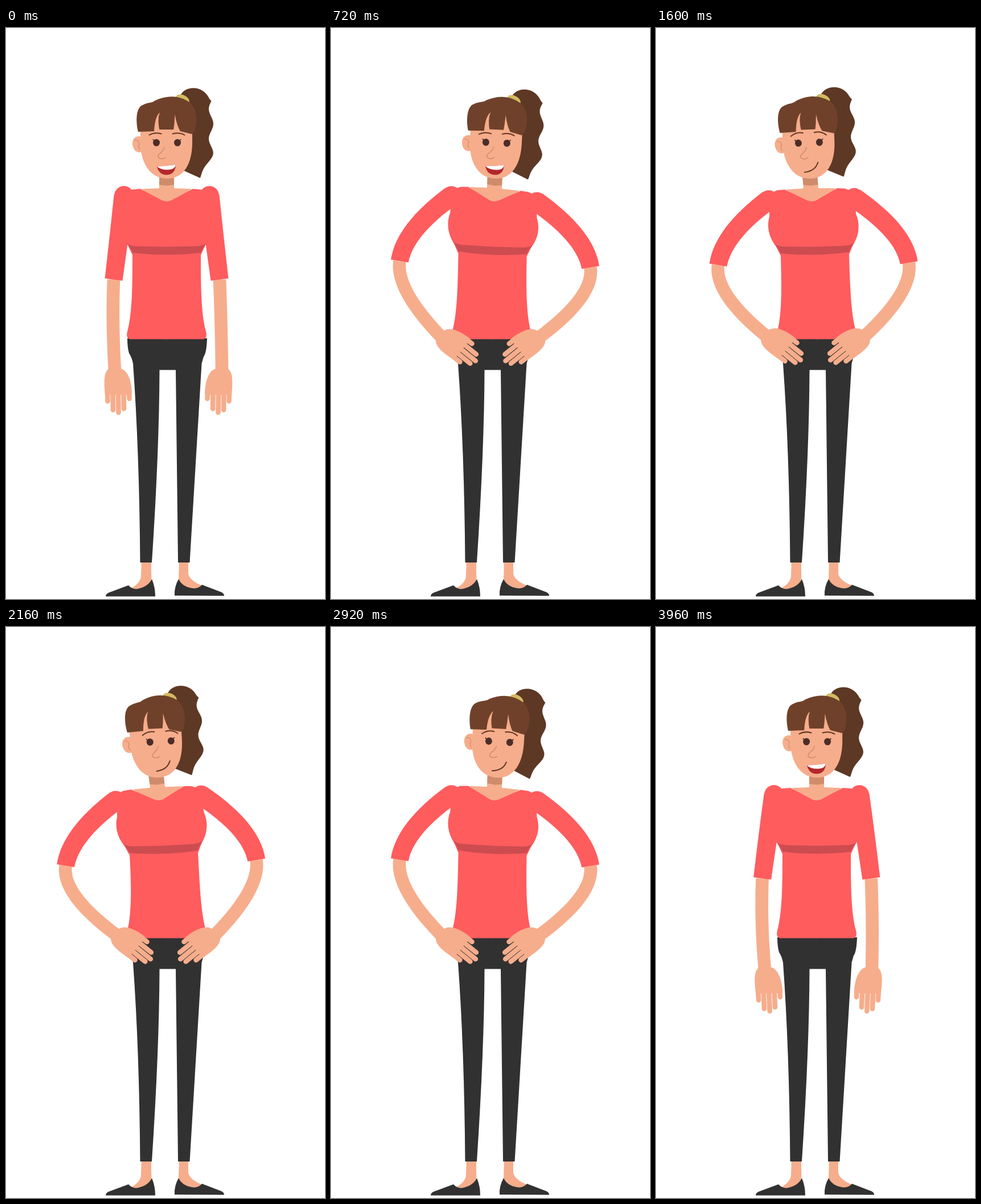
Write an HTML page with a canvas that moves like this. It is 560x1001 px and loops after 4 s.

```html
<!DOCTYPE html>
<html lang="en">
<head>
<meta charset="utf-8">
<title>Hands on hips</title>
<style>
html, body { margin: 0; width: 100%; height: 100%; overflow: hidden; background: #fff; }
canvas { display: block; width: 560px; height: 1001px; }
</style>
</head>
<body>
<canvas id="stage" width="560" height="1001"></canvas>
<script>
const g = document.getElementById('stage').getContext('2d');
const LOOP = 4000, STEP = 40, RAD = Math.PI / 180, MID = 282;
const C = {
  shirt: '#ff5c5e', fold: '#cd4c50', pants: '#313131', skin: '#f6ad8c', shade: '#cf8c6b',
  fringe: '#70412a', tail: '#5d3825', tie: '#d3bb62', eye: '#4c2d27', brow: '#603620', lip: '#b3272b'
};

const mix = (a, b, k) => a + (b - a) * k;
const ease = u => (1 - Math.cos(Math.PI * Math.min(1, Math.max(0, u)))) / 2;
// Rises from 0 to 1 and back between two times
const bump = (t, from, to) => ease(1 - Math.abs(2 * (t - from) / (to - from) - 1));

function fill(d, color) {
  g.fillStyle = color;
  g.fill(new Path2D(d));
}

function line(d, color, width) {
  g.strokeStyle = color;
  g.lineWidth = width;
  g.lineCap = g.lineJoin = 'round';
  g.stroke(new Path2D(d));
}

function dot(x, y, rx, ry, color, turn = 0) {
  g.fillStyle = color;
  g.beginPath();
  g.ellipse(x, y, rx, ry, turn, 0, 7);
  g.fill();
}

// Bends the torso: the higher the point, the more it shifts and tilts
function bender(dx, tilt) {
  return (x, y) => {
    const w = Math.max(0, (545 - y) / 250);
    return [x + dx * w * w, y + (x - MID) * Math.tan(tilt * RAD) * w];
  };
}

// Fills a half shape and its mirror image, both bent
function both(d, color, bend) {
  for (const side of [1, -1]) {
    fill(d.replace(/([\d.]+),([\d.]+)/g, (_, x, y) => bend(MID + side * (x - MID), +y).join()), color);
  }
}

function torso(bend) {
  both('M269,250 L283,250 L283,306 L268,304 L238,282 L269,281 Z', C.skin, bend);
  both('M269,250 L283,250 L283,276.5 L269,275 Z', C.shade, bend);
  both('M236,282 L222,283 L207,290 L206,328 C200,345 202,364 214,381 L222,398 ' +
    'C222,445 222,500 213,532 Q210,543 217,545.5 L283,545.5 L283,304 Q276,304 270,300 Z', C.shirt, bend);
}

function fold(bend) {
  both('M211,376.5 Q217,382 230,382.5 L283,383.5 L283,397.5 Q250,397.5 222,394 Q219,385 211,376.5 Z', C.fold, bend);
}

// Tapered strip along a quadratic curve
function strip(a, c, b, w0, w1, color) {
  const left = [], right = [], n = 16;
  for (let i = 0; i <= n; i++) {
    const u = i / n, v = 1 - u, w = mix(w0, w1, u);
    const [x, y] = a.map((p, k) => v * v * p + 2 * u * v * c[k] + u * u * b[k]);
    const [dx, dy] = a.map((p, k) => v * (c[k] - p) + u * (b[k] - c[k]));
    const nx = -dy / Math.hypot(dx, dy) * w, ny = dx / Math.hypot(dx, dy) * w;
    left.push([x + nx, y + ny]);
    right.unshift([x - nx, y - ny]);
  }
  fill('M' + left.concat(right).join('L') + 'Z', color);
}

function hand([x, y], side, turn) {
  g.save();
  g.translate(x, y);
  g.scale(-side, 1);
  g.rotate(turn * RAD);
  fill('M-10 -3 C-18 2 -20 14 -17 43 L22 43 L30 42 C30 22 24 0 10 -3 Z', C.skin);
  for (let i = 0; i < 5; i++) {
    const fx = -13 + 9.5 * i, tip = 74 - 5.5 * (i - 1.9) ** 2;
    line(`M${fx} 38 L${fx + 0.5} ${tip}`, C.skin, 8.6);
  }
  g.restore();
}

// side is -1 for the arm at the left, 1 for the one at the right
function arm(side, m, lean, tilt, bend) {
  const lift = ease(m / 700) ** 0.7, reach = ease(m / 800);
  const axis = MID + 6 * lift - 16 * lean;
  const out = mix(93, 167.5, lift);
  const cuffY = 441 - 27.5 * reach + side * 1.4 * tilt * lift;
  const cuff = [axis + side * out, cuffY];
  const upper = [axis + side * (out - 9), cuffY - 70 + 15 * lift];
  const lower = [axis + side * (out + 3 + 4 * lift), cuffY + 78 - 28 * lift];
  const wrist = [285 - 5 * reach + side * (94 - 7 * reach), 600 - 60.5 * reach];
  const top = bend(MID + side * 75, 294);
  top[1] += 5.5 * lift;

  strip(cuff, lower, wrist, 11.3, 11.3, C.skin);
  hand(wrist, side, -50 * lift);
  dot(...top, 17, 17, C.shirt);
  strip(top, upper, cuff, 17.5, 15.6, C.shirt);
}

function legs() {
  fill('M238 930 L255 930 L255 955 Q257 970 250 980 L212 986 Q237 975 237 960 Z', C.skin);
  fill('M304 930 L320 930 L320 957 Q323 970 348 979 L345 986 L310 984 L303 968 Z', C.skin);
  fill('M175 996.5 Q175 992 180 990 L215 977 Q222 985 232 983 Q250 979 256 966 Q262 980 262 996.5 Z', C.pants);
  fill('M296 995 Q295 980 303 966 Q309 979 326 982 Q337 984 344 976 L378 989 Q383 991 383 995.5 Z', C.pants);
  line('M177 999 H261 M298 999 H381', '#e6e6e6', 1);
  fill('M213 544 L353 544 Q352 570 347 576 L343.5 588 L322.5 937 L302 937 L298 599.5 L269.5 599.5 ' +
    'Q269 740 256 937 L235.5 937 Q234 740 223 588 Q221 578 216 570 Q213 560 213 544 Z', C.pants);
}

function ponytail() {
  let d = 'M306 119 C312 102 345 98 357 124';
  for (let y = 128; y <= 263; y += 3) {
    const x = 360 + 4 * Math.cos((y - 168) / 8.3) - Math.max(0, y - 215) ** 2 / 110;
    d += ` L${x} ${y}`;
  }
  fill(d + ' L312 250 L322 180 Z', C.tail);
}

function mouth(open) {
  if (open) {
    fill('M265 242.5 Q283 242 298 239.5 Q297 257 282 257.5 Q268 257 265 242.5 Z', C.lip);
    fill('M265 242.5 Q283 242 298 239.5 Q297 248 285 248.5 Q271 249 265 242.5 Z', '#fff');
  } else {
    line('M273 252.5 Q292 251 297 236', C.brow, 2);
  }
}

function head(t, dx, turn, look) {
  const open = t < 760 || t > 3240, raise = open ? 0 : 2;
  g.save();
  g.translate(MID + dx, 275);
  g.rotate(turn * RAD);
  g.translate(-MID, -275);

  ponytail();
  dot(310, 125, 12.5, 7.5, C.tie, 0.45);
  fill('M240 192 C228 185 219 196 223 208 C226 218 234 220 240 216 Z', C.skin);
  line('M226 197 Q233 196 234 203 Q231 208 235 213', C.shade, 1.2);
  fill('M236 172 L236 205 C237 232 250 264 283 264 C312 264 327 238 327 200 L327 172 Z', C.skin);
  fill('M232 182 C228 166 227 140 240 135 C249 130 256 132 262 127 C284 117 304 118 322 130 ' +
    'C337 143 336 165 331 181 L326 186 L306 181 L295 178 L269 178 L261 181 Z', C.fringe);
  fill('M260 182 Q261 156 270 148 Q265 160 270 182 Z', C.skin);
  fill('M293.5 182 Q296 168 296.5 152 Q300 172 307 183 Z', C.skin);

  g.translate(look, 0);
  for (const side of [-1, 1]) {
    const x = 282.5 + side * 18.5;
    dot(x, 201, 6, 6.3, C.eye);
    line(`M${x + side * 6} 195.5 l${-side * 3} 2.5`, C.eye, 1.6);
    line(`M${x + side * 12.5} ${187.5 + raise / 2} Q${x + side * 3} ${182 - raise / 2} ${x - side * 8.5} ${185.5 - raise}`, C.brow, 2);
  }
  line('M278 209 Q276 216 269 221 Q264 227 271 229 Q276 230 280 227', C.shade, 1.5);
  mouth(open);
  g.restore();
}

function draw(t) {
  // The body moves the same way forwards and backwards
  const m = Math.min(t, LOOP - t);
  const rise = ease(m / 480), lean = ease((m - 1100) / 780);
  const tilt = 4 * rise - 7.6 * lean;
  const bend = bender(4.4 * rise - 18.8 * lean, tilt);

  // The head starts early and swings past on its return
  const sway = ease((t - 960) / 880) - ease((t - 2130) / 790);
  const swing = bump(t, 2440, 3400);

  g.fillStyle = '#fff';
  g.fillRect(0, 0, 560, 1001);
  legs();
  torso(bend);
  for (const side of [-1, 1]) arm(side, m, lean, tilt, bend);
  fold(bend);
  head(t,
    4.5 * rise - 18.5 * sway + 3 * swing,
    2.6 * rise - 5.8 * sway + 0.7 * swing,
    8 * bump(t, 1600, 3100) - 4.6 * bump(t, 700, 1700));
}

const start = performance.now();
function tick() {
  const t = (performance.now() - start) % LOOP;
  draw(Math.floor(t / STEP) * STEP);
  requestAnimationFrame(tick);
}
tick();
</script>
</body>
</html>
```
